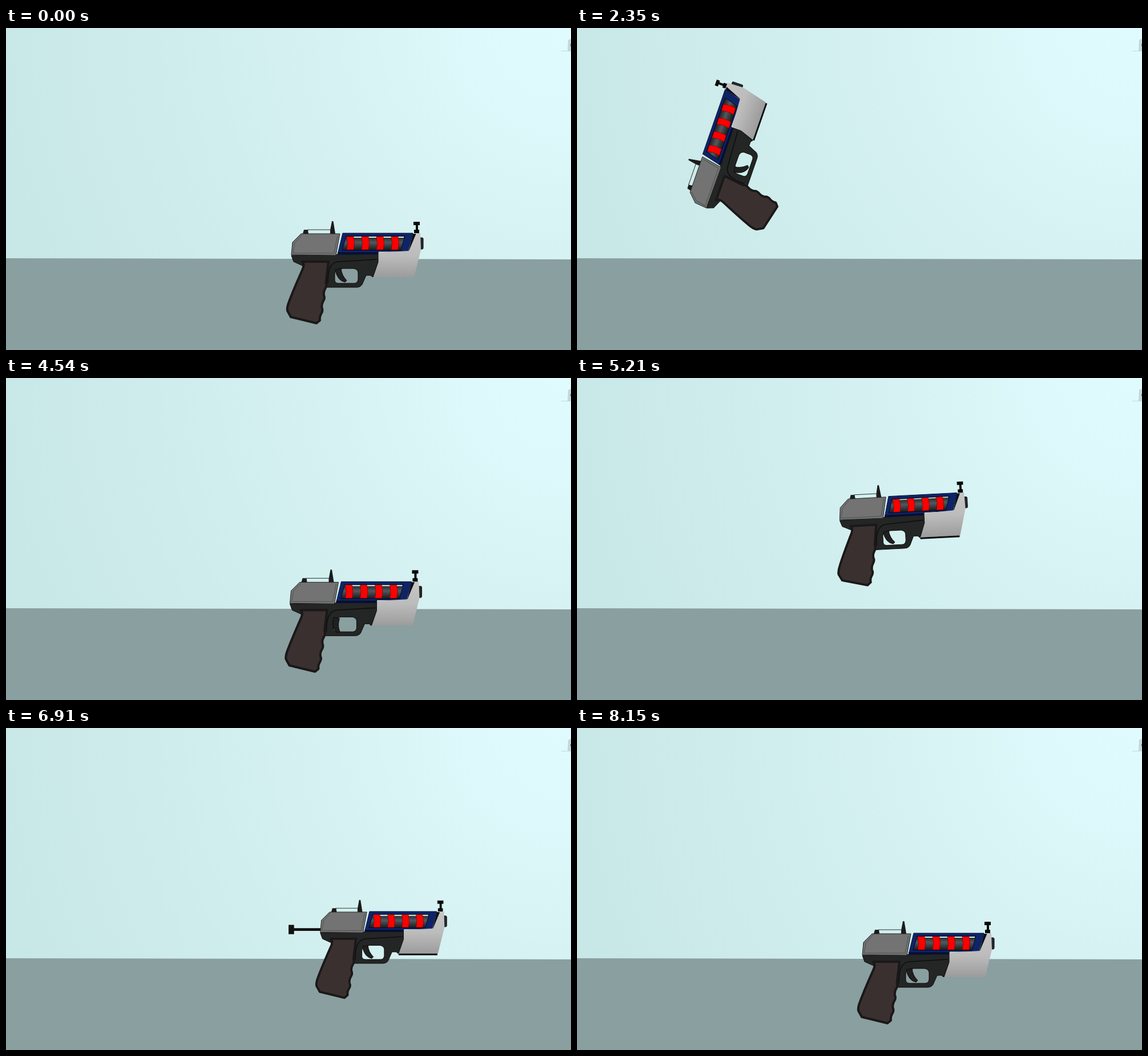
Animation of 990 by 565 pixels, one loop 8.18 s. Source, as an HTML page:

```html
<!DOCTYPE html>
<html lang="en">
<head>
<meta charset="utf-8">
<title>Recoil</title>
<style>
  html, body { margin: 0; width: 100%; height: 100%; overflow: hidden; background: #8a9fa0; }
  svg { display: block; width: 100vw; height: 100vh; }
</style>
</head>
<body>
<svg viewBox="0 0 990 565" preserveAspectRatio="none">
  <defs>
    <radialGradient id="sky" gradientUnits="userSpaceOnUse" cx="970" cy="0" r="1000">
      <stop offset="0" stop-color="#e0fbfd"/>
      <stop offset=".16" stop-color="#def9fb"/>
      <stop offset=".4" stop-color="#d6f2f2"/>
      <stop offset=".62" stop-color="#d1eeee"/>
      <stop offset="1" stop-color="#c8e7e7"/>
    </radialGradient>
    <linearGradient id="shroud" x2="0" y2="1">
      <stop offset="0" stop-color="#c6c6c6"/>
      <stop offset=".5" stop-color="#bcbcbc"/>
      <stop offset="1" stop-color="#9c9c9c"/>
    </linearGradient>
    <linearGradient id="steel" x2="0" y2="1">
      <stop offset="0" stop-color="#1c2024"/>
      <stop offset=".45" stop-color="#53585c"/>
      <stop offset="1" stop-color="#17191c"/>
    </linearGradient>
  </defs>

  <rect width="990" height="410" fill="url(#sky)"/>
  <path d="M0 404L990 406V565H0Z" fill="#8a9fa0"/>
  <path d="M985 21L990 19V41H973V40H984Z" fill="#c2d8d8"/>
  <rect x="989" y="28" width="1" height="4" fill="#586464"/>

  <g id="gun" stroke-linejoin="round">
    <g id="rod" fill="#111">
      <rect y="-2.5" width="62" height="5"/>
      <rect x="-5" y="-8.5" width="10" height="17"/>
    </g>

    <!-- frame, trigger guard and trigger -->
    <path fill="#242525" stroke="#0b0b0b" fill-rule="evenodd"
      d="M500 399L652 396V412L642 437L639 434H631L624 450Q621 455 614 455H561L548 430L504 410Z
         M580 424Q576 426 576 432V443Q577 448 583 448H610Q616 448 617 441V429Q616 423 609 422H590Z"/>
    <path d="M564 448Q563 412 582 410L650 406" fill="none" stroke="#0e0e0e" stroke-width="1.6"/>
    <path id="trigger" d="M577 424L587 422Q588 434 597 443L594 446Q580 443 577 424Z" fill="#202020" stroke="#0b0b0b"/>

    <!-- grip -->
    <path id="grip" fill="#3b3030" stroke="#1a1818" stroke-width="4"/>

    <!-- rear housing and sight -->
    <path d="M500 398L502 376L517 361H585L578 399Z" fill="#737373" stroke="#222"/>
    <path d="M519 363L506 377L503 395H575L581 364" fill="none" stroke="#505050"/>
    <path d="M522 354H529L530 361H520ZM571 339H573.5L577 361H568V355Z" fill="#1b1b1b"/>
    <path d="M528 354H570" stroke="#2a3030"/>

    <!-- magazine -->
    <path d="M590 360H713L704 392H653L651 397H581Z" fill="#0f2468" stroke="#071236"/>
    <path d="M596 365H699L692 390H589Z" fill="url(#steel)" stroke="#050b22"/>
    <path id="slit" d="M597 367H697" stroke="#d8eeee" stroke-width="2"/>
    <path d="M581 395H651" stroke="#060d2c" stroke-width="3"/>
    <g id="cells" fill="#fe0000" stroke="#6d0000" stroke-width=".6"></g>

    <!-- muzzle and front sight -->
    <rect x="724" y="368" width="7" height="20" rx="2" fill="#24272b" stroke="#111"/>
    <path d="M713 361H719L709 392H705Z" fill="#0c0e14"/>
    <path d="M719 360H726L727 389L715 437H643L652 411V394L706 391Z" fill="url(#shroud)"/>
    <path d="M643 437L652 411V394" fill="none" stroke="#111"/>
    <path id="underside" d="M643 438.5H714" stroke="#0b0b0b" stroke-width="3"/>
    <path d="M714 343H725M715 357H724" stroke="#090909" stroke-width="6"/>
    <path d="M720 343V357" stroke="#090909" stroke-width="4"/>
  </g>
</svg>
<script>
const LOOP = 8180;
const PIVOT = { x: 548, y: 450 };
const SHOTS = [30, 850, 2080, 2900, 3900, 4720, 5560];
const $ = id => document.getElementById(id);

// Three finger grooves run up the front edge of the grip
const grooves = 'q-1 -6 2 -11q4 -6 1.5 -11'.repeat(3);
$('grip').setAttribute('d',
  `M519 410Q524 415 519 425Q503 461 496 480Q492 490 493 496L499 507L544 518L550 513${grooves}L565 410Z`);

$('cells').innerHTML = Array.from({ length: 4 }, (_, i) =>
  `<path d="M${597 + 26 * i} 366h12q3 12 0 23h-12q3 -11 0 -23Z"/>`).join('');

const progress = (t, from, to) => Math.min(1, Math.max(0, (t - from) / (to - from)));
const smooth = u => u * u * (3 - 2 * u);
const ramp = (t, from, to) => smooth(progress(t, from, to));
const sech = v => 1 / Math.cosh(v);

// Recoil: the gun jumps up, sweeps back while tipping, and settles again
function recoil(t) {
  const fromPeak = t - 330, rising = fromPeak < 0;
  return {
    sweep: sech(fromPeak / (rising ? 67 : 54.7)),
    tip: Math.exp(-((fromPeak / (rising ? 92 : 85)) ** 2)),
    lift: Math.exp(-(((t - 345) / 234) ** 6))
  };
}

// Reload: the gun is raised, held, then lunges forward and returns
function reload(t) {
  const up = progress(t, 6690, 7190);
  const held = 1 - ramp(t, 7440, 7900);
  return {
    forward: (1 - (1 - up) ** 3) * held,
    raise: smooth(up) * held,
    lunge: Math.sin(Math.PI * progress(t, 7440, 8150)) ** 2
  };
}

function draw(t) {
  const shot = SHOTS.findLast(s => s <= t) ?? -LOOP;
  const { sweep, tip, lift } = recoil(t - shot);
  const { forward, raise, lunge } = reload(t);

  const x = PIVOT.x - 365 * sweep + 59 * forward + 175 * lunge;
  const y = PIVOT.y - 162 * lift - 101 * raise + 18 * lunge;
  const angle = -107 * tip + 6 * lunge;
  const scale = 1 - .028 * lift - .05 * forward;
  $('gun').setAttribute('transform',
    `translate(${x} ${y}) rotate(${angle}) scale(${scale}) translate(${-PIVOT.x} ${-PIVOT.y})`);

  const reach = (52 * ramp(t, 5700, 5800) + 14 * ramp(t, 6690, 6910)) * (1 - ramp(t, 7440, 7640));
  $('rod').setAttribute('transform', `translate(${513 - reach} 393)`);
  $('rod').setAttribute('opacity', reach > 1 ? 1 : 0);

  $('underside').setAttribute('opacity', progress(PIVOT.y - y, 10, 40));
  $('slit').setAttribute('opacity', 1 - progress(-angle, 0, 15));

  const squeeze = progress(t - shot, 560, 600) * (1 - progress(t - shot, 700, 740));
  $('trigger').setAttribute('transform', `rotate(${24 * squeeze} 580 423)`);
}

const start = performance.now();
function tick() {
  draw((performance.now() - start) % LOOP);
  requestAnimationFrame(tick);
}
tick();
</script>
</body>
</html>
```
